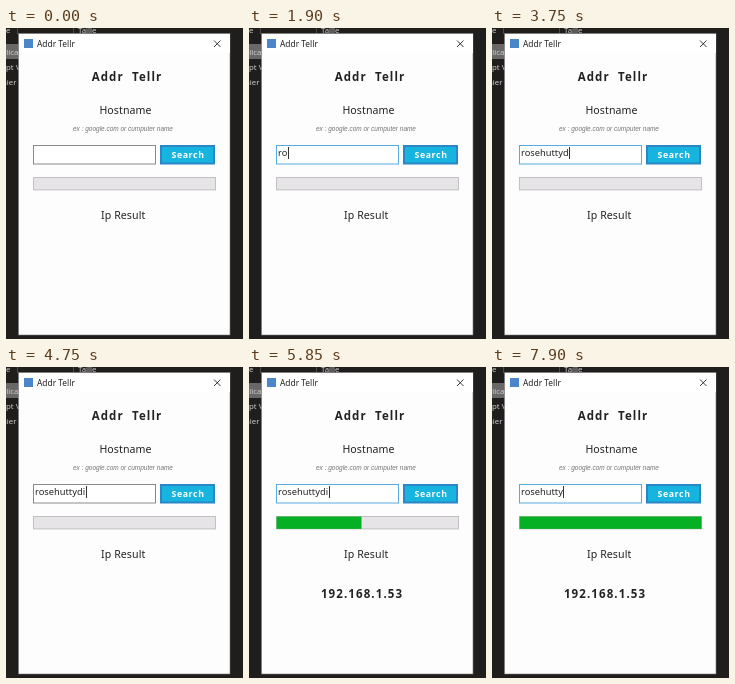
Write an HTML page that moves like this. It is 237 px wide and 311 px high and loops after 8 s.

```html
<!DOCTYPE html>
<html lang="en">
<head>
<meta charset="utf-8">
<title>Addr Tellr</title>
<style>
  html, body { margin: 0; width: 100%; height: 100%; overflow: hidden; background: #201d1d; }
  svg { display: block; width: 237px; height: 311px; }
  text { font-family: "Noto Sans", "Open Sans", sans-serif; fill: #222; white-space: pre; }
  .mid { text-anchor: middle; }
  .bold { font-weight: bold; }
  .wide { font-size: 11.5px; letter-spacing: 1.1px; }
  .side text { font-size: 7.8px; fill: #cfcdcd; }
  .label { font-size: 10.6px; letter-spacing: .08px; }
  .hint { font: italic 6.47px "Liberation Sans", Arial, sans-serif; fill: #747474; }
  .typed { font-size: 9.3px; }
  .button { font-size: 8.8px; letter-spacing: .6px; fill: #fff; }

  /* Field border: idle, focused, idle, focused */
  #field { fill: #fff; stroke: #8a8a8a; animation: focus 8s step-end infinite; }
  @keyframes focus {
    0% { stroke: #8a8a8a; }
    13.75% { stroke: #58aae2; }
    57.5% { stroke: #8a8a8a; }
    70% { stroke: #58aae2; }
  }
</style>
</head>
<body>
<svg viewBox="0 0 237 311">
  <rect width="237" height="311" fill="#201d1d"/>
  <g class="side">
    <path d="M11.5 0V6M67.5 0V6" stroke="#4c4949"/>
    <rect y="16" width="13" height="15" fill="#696767"/>
    <text x="0" y="5">e</text>
    <text x="72" y="5">Taille</text>
    <text x="-4.5" y="27">plica</text>
    <text x="0" y="42">pt V</text>
    <text x="-4" y="57">hier</text>
  </g>

  <rect x="12.5" y="5.5" width="211.5" height="301.5" fill="#fdfdfd" stroke="#777" stroke-width=".6"/>
  <rect x="13" y="6" width="211" height="19" fill="#fff"/>
  <rect x="18" y="11" width="9" height="9" fill="#4a86c8"/>
  <text x="31" y="18.5" font-size="8.4">Addr Tellr</text>
  <path d="M208 12.5l6.5 6.5m0-6.5l-6.5 6.5" stroke="#222" stroke-width=".9" fill="none"/>

  <text class="mid bold wide" x="121" y="52.6">Addr  Tellr</text>
  <text class="mid label" x="119.5" y="85.5">Hostname</text>
  <text class="mid hint" x="117" y="102.5">ex : google.com or cumputer name</text>

  <rect id="field" x="27.5" y="117.5" width="122" height="18.5"/>
  <text id="typed" class="typed" x="29" y="127.8"></text>
  <rect id="caret" y="119" width="1" height="12" fill="#333"/>

  <rect x="154" y="117" width="55" height="19.5" fill="#2b86c6"/>
  <rect x="156" y="119" width="51" height="15.5" fill="#16b4de"/>
  <text class="mid bold button" x="182" y="129.8">Search</text>

  <rect x="27.5" y="149.5" width="182" height="12.4" fill="#e6e4e6" stroke="#c2c0c2"/>
  <rect id="bar" x="27.5" y="149.5" height="12.4" fill="#06b025"/>

  <text class="mid label" x="117.2" y="191.2">Ip Result</text>
  <text id="result" class="mid bold wide" x="113" y="230.8">192.168.1.53</text>
</svg>
<script>
  const LOOP = 8000, FOCUS = 1100, FOUND = 5600, FILL = 535;
  const host = "rosehuttydi";
  const keys = [1700, 1850, 2000, 2350, 2500, 2750, 2900, 3050, 3250, 3450, 4100];
  const erases = [7850, 7900];
  const caretOff = [[0, FOCUS], [6250, 6600], [7100, 7500]];

  const [typed, caret, bar, result] =
    ["typed", "caret", "bar", "result"].map(id => document.getElementById(id));
  const passed = (times, t) => times.filter(x => x <= t).length;

  function draw(t) {
    const count = passed(keys, t) - passed(erases, t);
    typed.textContent = host.slice(0, count);
    const width = count ? typed.getComputedTextLength() : 0;
    caret.setAttribute("x", Math.round(29.5 + width));
    const hidden = caretOff.some(([from, to]) => t >= from && t < to);
    caret.setAttribute("visibility", hidden ? "hidden" : "visible");

    // The bar advances in 50 ms ticks
    const elapsed = Math.floor((t - FOUND) / 50) * 50;
    const part = Math.min(1, Math.max(0, elapsed / FILL));
    bar.setAttribute("width", Math.round(182 * part));
    result.setAttribute("visibility", t >= FOUND ? "visible" : "hidden");
  }

  function tick() {
    draw(performance.now() % LOOP);
    requestAnimationFrame(tick);
  }

  // Share one clock with the CSS border animation
  document.getAnimations().forEach(a => { a.startTime = 0; });
  tick();
</script>
</body>
</html>
```
